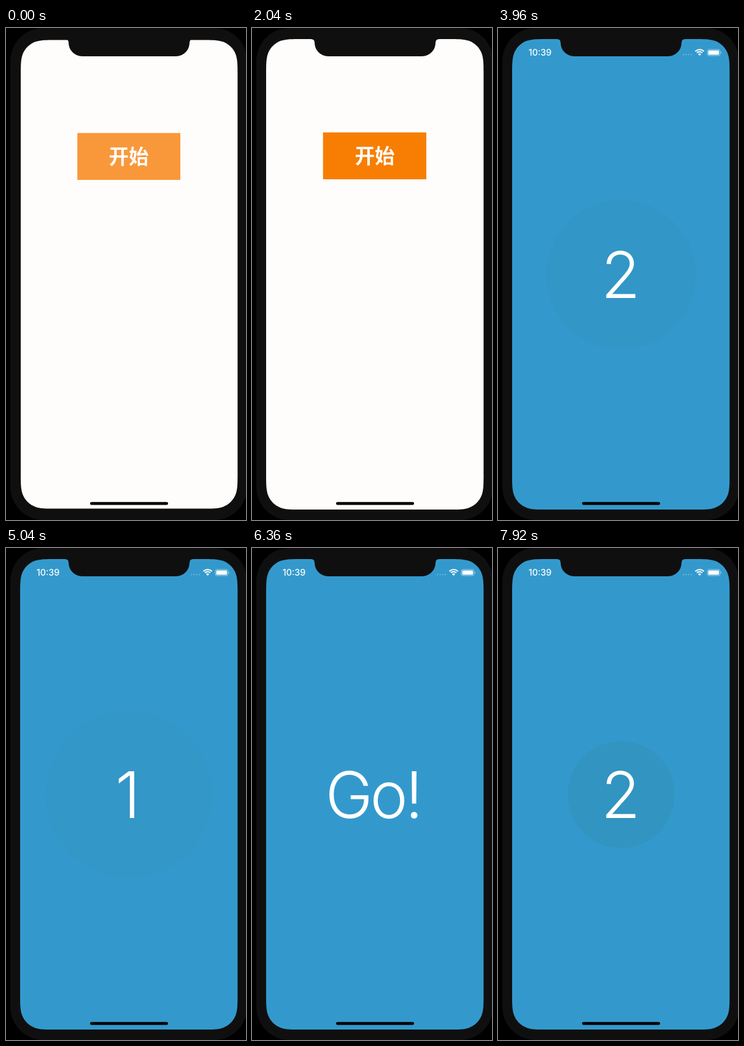
These frames come from a looping animation (391 px wide and 800 px high, 8000 ms). An HTML page with a canvas:

```html
<!DOCTYPE html>
<html lang="zh">
<head>
<meta charset="utf-8">
<title>Countdown</title>
<style>
html, body { margin: 0; width: 100%; height: 100%; overflow: hidden; background: #000; }
canvas { display: block; width: 391px; height: 800px; }
</style>
</head>
<body>
<canvas id="stage"></canvas>
<script>
const LOOP = 8000, TICK = 120, COUNT_START = 2280;
const BLUE = '#3399cc', BEZEL = '#0f0f10';
const SANS = 'Inter, "Open Sans", sans-serif';
// Each label starts at its own time and stays until the next one.
const LABELS = [
  { at: 2280, text: '3' }, { at: 3265, text: '2' }, { at: 4250, text: '1' },
  { at: 5235, text: 'Go!' }, { at: 6480, text: '3' }, { at: 7480, text: '2' }
];

const canvas = document.getElementById('stage');
const ctx = canvas.getContext('2d');
const ratio = window.devicePixelRatio || 1;
canvas.width = 391 * ratio;
canvas.height = 800 * ratio;

const clamp = v => Math.max(0, Math.min(1, v));
const mix = (a, b, k) => a + (b - a) * k;
const smooth = k => k * k * (3 - 2 * k);

function box(x, y, w, h, r, fill) {
  ctx.beginPath();
  ctx.roundRect(x, y, w, h, r);
  ctx.fillStyle = fill;
  ctx.fill();
}

function disc(x, y, r, fill) {
  ctx.beginPath();
  ctx.arc(x, y, r, 0, Math.PI * 2);
  ctx.fillStyle = fill;
  ctx.fill();
}

// Rectangle whose corners ease into the straight sides.
function softBox(x, y, w, h, r, fill) {
  const corner = (cx, cy, ax, ay, bx, by) => {
    // (ax, ay) runs along the incoming side, (bx, by) along the outgoing one.
    const p = (a, b) => [cx + r * (a * ax + b * bx), cy + r * (a * ay + b * by)];
    ctx.lineTo(...p(1.529, 0));
    ctx.bezierCurveTo(...p(1.088, 0), ...p(0.868, 0), ...p(0.631, 0.075));
    ctx.bezierCurveTo(...p(0.373, 0.169), ...p(0.169, 0.373), ...p(0.075, 0.631));
    ctx.bezierCurveTo(...p(0, 0.868), ...p(0, 1.088), ...p(0, 1.529));
  };
  ctx.beginPath();
  corner(x, y, 0, 1, 1, 0);
  corner(x + w, y, -1, 0, 0, 1);
  corner(x + w, y + h, 0, -1, -1, 0);
  corner(x, y + h, 1, 0, 0, -1);
  ctx.closePath();
  ctx.fillStyle = fill;
  ctx.fill();
}

function drawScreen(inset, fill) {
  softBox(23 + inset, 18 + 1.5 * inset, 354.3 - inset, 765 - 3 * inset, 38, fill);
}

function drawNotch() {
  ctx.beginPath();
  ctx.moveTo(96, 17);
  ctx.lineTo(96, 18);
  ctx.quadraticCurveTo(102, 18, 102, 24);
  ctx.arcTo(102, 46, 124, 46, 22);
  ctx.arcTo(299, 46, 299, 24, 22);
  ctx.lineTo(299, 24);
  ctx.quadraticCurveTo(299, 18, 305, 18);
  ctx.lineTo(305, 17);
  ctx.closePath();
  ctx.fillStyle = BEZEL;
  ctx.fill();
}

function drawStart(t) {
  const k = smooth(clamp(t / 840));
  const inset = 1 - k;
  drawScreen(inset, '#fefdfb');
  const color = [mix(249, 247, k), mix(152, 126, k), mix(58, 2, k)].map(Math.round);
  box(115.7 + inset / 2, 169.7 + inset, 168.3 - inset / 2, 76.4, 0, `rgb(${color})`);
  ctx.fillStyle = '#fff';
  ctx.font = '700 32.5px "Noto Sans CJK SC", "Noto Sans CJK", sans-serif';
  ctx.textAlign = 'center';
  ctx.textBaseline = 'alphabetic';
  ctx.fillText('开始', 200, 220 + inset);
}

function drawStatus() {
  ctx.fillStyle = '#fff';
  ctx.font = '500 14.3px ' + SANS;
  ctx.textAlign = 'left';
  ctx.textBaseline = 'alphabetic';
  ctx.fillText('10:39', 49.8, 45);

  for (let i = 0; i < 4; i++) disc(302.3 + i * 4.3, 43.3, 1, 'rgba(255,255,255,.35)');

  ctx.strokeStyle = '#fff';
  ctx.lineWidth = 2;
  for (const r of [9.5, 6]) {
    ctx.beginPath();
    ctx.arc(328.5, 44.5, r, -Math.PI * 0.76, -Math.PI * 0.24);
    ctx.stroke();
  }
  ctx.beginPath();
  ctx.moveTo(328.5, 45);
  ctx.arc(328.5, 45, 3.6, -Math.PI * 0.76, -Math.PI * 0.24);
  ctx.fillStyle = '#fff';
  ctx.fill();

  ctx.beginPath();
  ctx.roundRect(341, 35, 20.5, 10, 2.5);
  ctx.strokeStyle = 'rgba(255,255,255,.5)';
  ctx.lineWidth = 1;
  ctx.stroke();
  box(342.5, 36.5, 17.5, 7, 1.2, '#fff');
  box(362.7, 38.5, 1.2, 3, 0.6, 'rgba(255,255,255,.5)');
}

// Pop in past full size, then settle.
function popScale(age) {
  if (age < 250) return 1.45 * age / 250;
  return mix(1.45, 1, smooth(clamp((age - 250) / 180)));
}

function drawCount(t) {
  drawScreen(0, BLUE);
  drawStatus();
  const label = LABELS.filter(l => l.at <= t).pop();
  const age = t - label.at;
  const isWord = label.text.length > 1;

  if (!isWord) {
    const radius = 43 + 0.078 * age + 0.00005 * age * age;
    const alpha = Math.min(0.18, 0.32 * clamp(1 - age / 1000));
    disc(200.5, 401, radius, `rgba(48,120,140,${alpha})`);
  }

  const scale = popScale(age);
  ctx.save();
  ctx.translate(200, 401);
  ctx.scale(scale, scale);
  ctx.globalAlpha = clamp(age / 140);
  ctx.fillStyle = '#fff';
  ctx.font = '350 104px ' + SANS;
  ctx.textAlign = 'left';
  ctx.textBaseline = 'alphabetic';
  ctx.letterSpacing = isWord ? '-4.5px' : '0px';
  // Center on the visible ink.
  const m = ctx.measureText(label.text);
  const shift = label.text === '1' ? -4 : isWord ? -2 : 0;
  ctx.fillText(label.text, (m.actualBoundingBoxLeft - m.actualBoundingBoxRight) / 2 + shift, 37.5);
  ctx.restore();
}

function draw(t) {
  ctx.setTransform(ratio, 0, 0, ratio, 0, 0);
  ctx.fillStyle = '#000';
  ctx.fillRect(0, 0, 391, 800);
  box(7, 0, 386, 800, 54, BEZEL);
  if (t < COUNT_START) drawStart(t);
  else drawCount(t);
  drawNotch();
  box(137, 770.8, 127, 4.7, 2.3, '#000');
}

const origin = performance.now();
function frame() {
  const t = (performance.now() - origin) % LOOP;
  draw(Math.floor(t / TICK) * TICK);
  requestAnimationFrame(frame);
}
frame();
</script>
</body>
</html>
```
